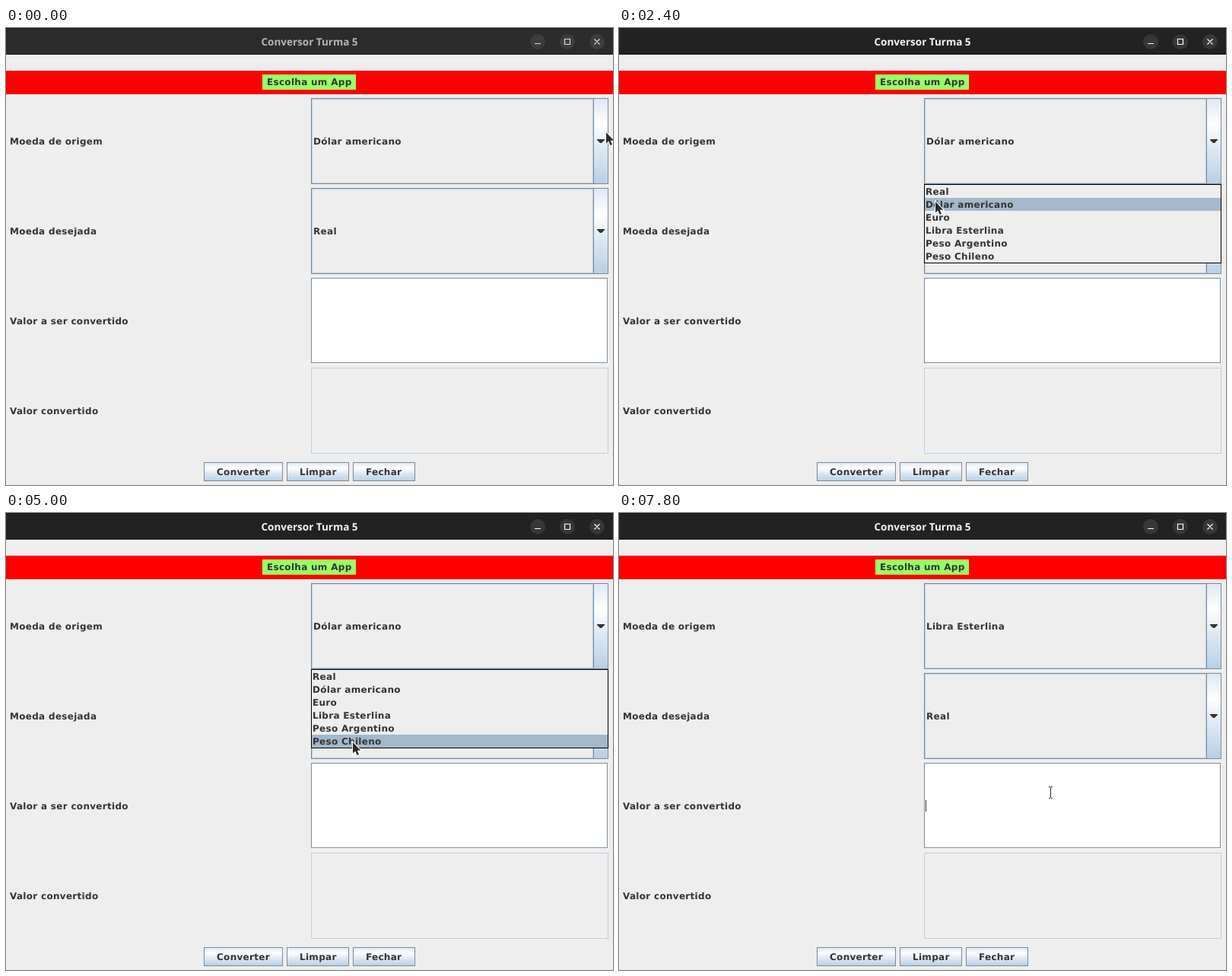
An HTML page for the animation above (8000 ms loop, 798 by 600 pixels).

```html
<!DOCTYPE html>
<html lang="pt">
<head>
<meta charset="utf-8">
<title>Conversor</title>
<style>
  html, body { margin: 0; width: 100%; height: 100%; overflow: hidden; background: #eee; }
  svg { display: block; width: 798px; height: 600px; }
  text { font: bold 12px "DejaVu Sans", sans-serif; letter-spacing: .3px; fill: #333; text-rendering: geometricPrecision; }
  #title { font: 700 13.5px "Open Sans", "Noto Sans", sans-serif; letter-spacing: 0; }
</style>
</head>
<body>
<svg id="stage" viewBox="0 0 798 600">
  <defs>
    <linearGradient id="steel" x2="0" y2="1">
      <stop offset="0" stop-color="#dde8f3"/>
      <stop offset=".3" stop-color="#fff"/>
      <stop offset=".6" stop-color="#dde8f3"/>
      <stop offset="1" stop-color="#b8cfe5"/>
    </linearGradient>
  </defs>
</svg>
<script>
const LOOP = 8000, STEP = 100;
const OPEN = 300, CLOSE = 5900, FIELD_CLICK = 7600;
const DARK = '#7a8a99', LIGHT = '#b8cfe5', PANEL = '#eee', SELECTED = '#a3b8cc', INK = '#333';
const ROW_TOP = 206, ROW_HEIGHT = 17, HOVER_LAG = 40;
const currencies = ['Real', 'Dólar americano', 'Euro', 'Libra Esterlina', 'Peso Argentino', 'Peso Chileno'];

const linear = k => k;
const slowStart = k => k ** 1.6;
const smooth = k => k * k * (3 - 2 * k);

// Pointer gestures; it rests between them
const home = { x: 789, y: 137 };
const gestures = [
  { from: 500, to: 900, x: 668, y: 208, ease: linear },
  { from: 900, to: 1300, x: 514, y: 253, ease: linear },
  { from: 1500, to: 1900, x: 447, y: 252, ease: linear },
  { from: 2000, to: 2400, x: 416, y: 228, ease: linear },
  { from: 2400, to: 2700, x: 420, y: 211, ease: linear },
  { from: 3200, to: 3900, x: 447, y: 262, ease: slowStart },
  { from: 4200, to: 4600, x: 455, y: 304, ease: linear },
  { from: 4900, to: 5400, x: 473, y: 265, ease: slowStart },
  { from: 6100, to: 7000, x: 771, y: 274, ease: smooth },
  { from: 7000, to: 7500, x: 588, y: 394, ease: smooth },
  { from: 7500, to: 7800, x: 568, y: 367, ease: linear }
];

const stage = document.getElementById('stage');

function add(name, attrs, parent = stage) {
  const node = document.createElementNS('http://www.w3.org/2000/svg', name);
  for (const key in attrs) node.setAttribute(key, attrs[key]);
  return parent.appendChild(node);
}
const box = (x, y, width, height, fill, parent) => add('rect', { x, y, width, height, fill }, parent);
const frame = (x, y, w, h, stroke, fill, parent) =>
  add('rect', { x: x + .5, y: y + .5, width: w - 1, height: h - 1, stroke, fill }, parent);
function label(x, y, string, parent) {
  const node = add('text', { x, y }, parent);
  node.textContent = string;
  return node;
}
const show = (node, on) => node.setAttribute('visibility', on ? 'visible' : 'hidden');

function combo(y, value) {
  frame(401, y, 372, 113, DARK, PANEL);
  const fill = frame(402, y + 1, 370, 111, LIGHT, PANEL);
  frame(772, y, 20, 113, DARK, 'url(#steel)');
  add('path', { d: `M777 ${y + 54}h10v1l-4 4h-2l-4-4z`, fill: INK });
  return { fill, text: label(404, y + 61, value) };
}

// Window chrome
box(0, 0, 798, 600, PANEL);
const bar = box(0, 0, 798, 35);
box(0, 0, 798, 1, '#171717');
box(0, 34, 798, 1, '#151515');
const title = label(399, 23, 'Conversor Turma 5');
title.id = 'title';
title.setAttribute('text-anchor', 'middle');
const discs = [0, 1, 2].map(i => add('circle', { cx: 699 + 39 * i, cy: 18, r: 10 }));
const icons = add('path', { d: 'M695 20.5h8M734.5 14.5h7v7h-7zM773.5 14.5l7 7m0-7l-7 7', fill: 'none', 'stroke-width': 1.2 });

// Form
box(0, 56, 798, 31, '#f00');
box(337, 61, 123, 20, '#9f6');
label(343, 75, 'Escolha um App');
['Moeda de origem', 'Moeda desejada', 'Valor a ser convertido', 'Valor convertido']
  .forEach((string, i) => label(5, 153 + 118 * i, string));
const origin = combo(92, currencies[1]);
combo(210, currencies[0]);
box(402, 329, 390, 112, '#fff');
frame(401, 328, 390, 112, DARK, '#fff');
frame(401, 446, 391, 113, LIGHT, PANEL);
const caret = box(403, 377, 1, 15, INK);

function button(string, x, width) {
  frame(x, 570, width, 25, DARK, 'url(#steel)');
  label(x + 17, 587, string);
}
button('Converter', 260, 104);
button('Limpar', 369, 82);
button('Fechar', 456, 82);

// Drop-down list
const popup = add('g', {});
frame(401, 205, 391, 104, '#000', PANEL, popup);
const marker = box(402, ROW_TOP, 389, ROW_HEIGHT, SELECTED, popup);
currencies.forEach((name, i) => label(403, 219 + ROW_HEIGHT * i, name, popup));

// Pointers
const arrow = add('path', {
  d: 'M0 0V14.5L3.3 11.5 5.6 17 8 16 5.7 10.7H10.2Z',
  fill: '#2b2b2b', stroke: '#fff', 'stroke-width': 2, 'paint-order': 'stroke'
});
const beam = add('g', {});
for (const [stroke, width] of [['#fff', 3], ['#2b2b2b', 1]])
  add('path', { d: 'M-2.5-7.5h2m1 0h2M0-7V7M-2.5 7.5h2m1 0h2', fill: 'none', stroke, 'stroke-width': width }, beam);

function pointerAt(t) {
  let { x, y } = home;
  for (const move of gestures) {
    if (t <= move.from) break;
    const k = move.ease(Math.min(1, (t - move.from) / (move.to - move.from)));
    x += (move.x - x) * k;
    y += (move.y - y) * k;
  }
  return { x, y };
}

// The list reacts slightly after the pointer moves
function hoveredRow(t) {
  const { y } = pointerAt(t - HOVER_LAG);
  return y < ROW_TOP ? 1 : Math.min(5, Math.floor((y + 2 - ROW_TOP) / ROW_HEIGHT));
}

function render(now) {
  const t = Math.floor(now % LOOP / STEP) * STEP;
  const active = t >= OPEN, chosen = t >= CLOSE, typing = t >= FIELD_CLICK;

  bar.setAttribute('fill', active ? '#222' : '#2c2c2c');
  title.style.fill = active ? '#f5f5f5' : '#b5b5b5';
  discs.forEach(disc => disc.setAttribute('fill', active ? '#373737' : '#3d3d3d'));
  icons.setAttribute('stroke', active ? '#fff' : '#ddd');

  show(popup, active && !chosen);
  marker.setAttribute('y', ROW_TOP + ROW_HEIGHT * hoveredRow(t));
  origin.text.textContent = currencies[chosen ? 3 : 1];
  origin.fill.setAttribute('fill', chosen && !typing ? SELECTED : PANEL);
  show(caret, typing);

  const pointer = pointerAt(t);
  const x = Math.round(pointer.x), y = Math.round(pointer.y);
  const overField = y > 328;
  show(arrow, !overField);
  show(beam, overField);
  arrow.setAttribute('transform', `translate(${x} ${y})`);
  beam.setAttribute('transform', `translate(${x - .5} ${y})`);
}

const start = performance.now();
function tick() {
  render(performance.now() - start);
  requestAnimationFrame(tick);
}
tick();
</script>
</body>
</html>
```
